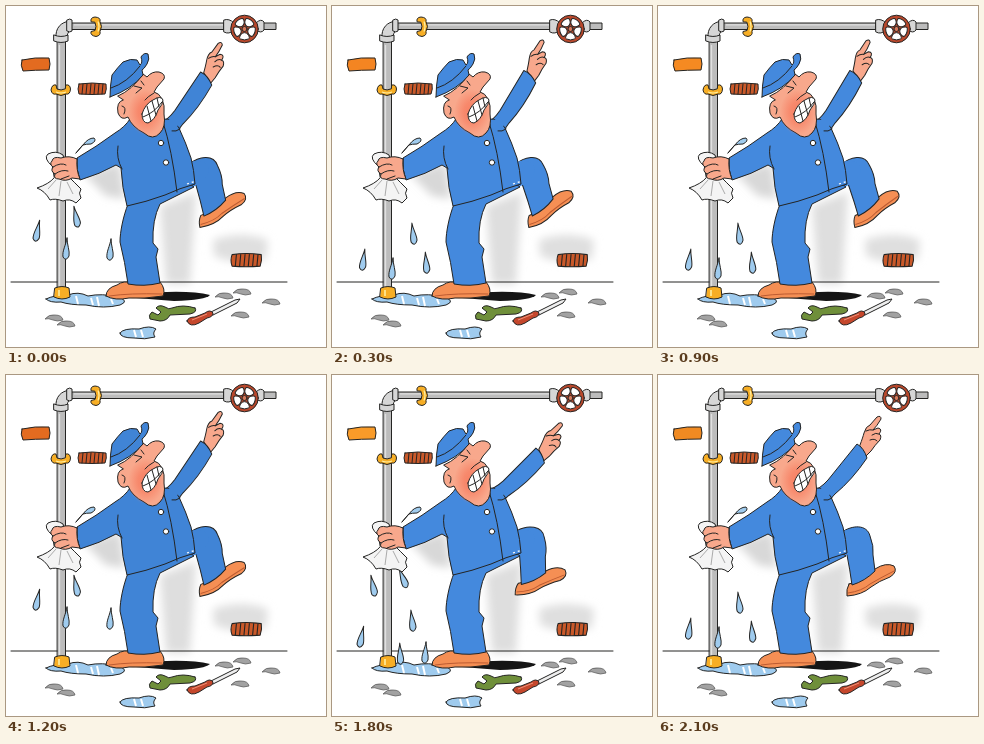
These frames come from a looping animation (320 by 341 pixels, 2.4 s). An HTML page:

```html
<!DOCTYPE html>
<html lang="en">
<head>
<meta charset="utf-8">
<title>Leaking pipe</title>
<style>
html, body { margin: 0; width: 100%; height: 100%; overflow: hidden; background: #fff; }
svg { display: block; width: 100vw; height: 100vh; }
.ink { stroke: #242423; stroke-width: 1; stroke-linejoin: round; stroke-linecap: round; }
.line { fill: none; }
.suit { fill: var(--suit); }
.skin { fill: #f8a88c; }
.shoe { fill: #f58f54; }
.steel { fill: #bcbcbc; }
.joint { fill: #d6d6d6; }
.brass { fill: #f7ae25; }
.brick { fill: #c9592a; }
.water { fill: #9fcbee; }
.stone { fill: #a2a2a2; stroke: #555; stroke-width: .7; }
</style>
</head>
<body>
<svg viewBox="0 0 320 341" preserveAspectRatio="none">
  <defs>
    <filter id="soft" x="-30%" y="-30%" width="160%" height="160%"><feGaussianBlur stdDeviation="4"/></filter>
    <radialGradient id="blush"><stop offset="0" stop-color="#f77f62"/><stop offset=".45" stop-color="#f77f62" stop-opacity=".75"/><stop offset="1" stop-color="#f77f62" stop-opacity="0"/></radialGradient>
    <g id="brickShape">
      <path class="ink brick" d="M1 1Q14-1 28 1Q29 6 27 11Q14 12 1 11Q-1 6 1 1Z"/>
      <path class="ink line" d="M5 1L4 11M9 1L8 11M13 1L12 11M17 1L16 11M21 1L20 11M25 1L24 11"/>
    </g>
    <g id="clamp">
      <path class="ink brass" d="M-5-5Q-6-9-1-9.5Q5-9 4-5Q7 0 4 5Q5 9 0 10Q-6 9-5 5L-1 4Q1 0-1-4Z"/>
      <path class="line" stroke="#fff2a8" stroke-width="1.2" d="M2-5Q4 0 2 5"/>
    </g>
    <path id="drop" class="ink water" d="M1-12C1-5 4 1 3 6Q0 12-3 7C-4 1 0-5 1-12Z"/>
    <path id="stone" class="stone" d="M-9 1Q-5-4 1-3Q8-3 9 2Q3 4-1 2Q-6 0-9 1Z"/>
  </defs>

  <!-- wall shadow and floor -->
  <g fill="#d8d8d8" filter="url(#soft)">
    <path d="M78 168L114 157L119 193L100 190Z"/>
    <path d="M154 200L190 186L184 278L160 278Z" fill="#dedede"/>
    <path d="M207 234Q235 224 262 234L260 253Q232 260 208 250Z" fill="#dfdfdf"/>
  </g>
  <path class="ink line" d="M5 276H281"/>
  <path d="M130 288Q180 283 204 289Q200 294 168 295L130 292Z" fill="#151515"/>

  <!-- bricks -->
  <path id="bareBrick" class="ink" d="M16 54Q29 51 43 52Q45 58 43 64Q29 64 17 65Q14 59 16 54Z"/>
  <use href="#brickShape" x="72" y="77"/>
  <use href="#brickShape" transform="translate(225 247.5) scale(1.08 1.15)"/>

  <!-- puddles and stones -->
  <path class="ink water" d="M40 293Q48 289 62 289Q72 285 82 290Q96 287 112 291Q124 295 114 299Q98 303 80 299Q64 299 55 296Q44 297 40 293Z"/>
  <path class="line" stroke="#fff" stroke-width="2" d="M70 290L72 298M85 292L87 299M91 291L93 300M105 293L107 298"/>
  <path class="ink water" d="M114 327Q117 322 133 323Q144 319 150 323Q146 327 149 331Q139 334 128 332Q114 332 114 327Z"/>
  <path class="line" stroke="#fff" stroke-width="2" d="M128 324L130 331M135 324L137 331"/>
  <use href="#stone" x="218" y="290"/>
  <use href="#stone" x="236" y="286"/>
  <use href="#stone" x="265" y="296"/>
  <use href="#stone" x="234" y="309"/>
  <use href="#stone" x="48" y="312"/>
  <use href="#stone" x="60" y="318"/>

  <!-- pipes -->
  <g class="ink steel">
    <path d="M66 17H218V23.5H66ZM256 17H270V23.5H256Z"/>
    <path d="M51.5 35H59.5V284H51.5Z"/>
  </g>
  <path stroke="#e0e0e0" stroke-width="1.3" d="M68 18.8H217M53.5 39V281"/>
  <g class="ink joint">
    <path d="M50 32C49 22 55 16 64 15V25Q61 26 61 33Z"/>
    <path d="M48 29Q55 32 62 29V35Q55 38 48 35Z"/>
    <path d="M61 14Q64 12 66 14V25Q64 27 61 25Z"/>
    <path d="M218 14Q223 12 228 17V24Q223 29 218 26Z"/>
    <path d="M250 17Q255 12 258 16V24Q255 28 250 24Z"/>
  </g>
  <use href="#clamp" x="90" y="20.5"/>
  <use href="#clamp" transform="translate(55 84) rotate(90)"/>
  <path class="ink brass" d="M49 282Q56 279 63 282L64 291Q56 295 48 291Z"/>
  <path stroke="#fff2a8" stroke-width="1.5" d="M53 284V290"/>
  <g transform="translate(238.5 23)">
    <circle class="ink" r="13.8" fill="#b9482c"/>
    <g id="holes"></g>
    <circle class="ink" r="2.5" fill="#d5795b"/>
  </g>

  <g id="drops"></g>
  <path class="ink water" d="M70 147L77 139Q82 132 88 132Q91 135 85 138Q80 138 77 139Z"/>

  <!-- tools -->
  <path class="ink" fill="#6f8f3a" d="M189 302Q192 306 184 308L164 309Q161 315 154 315L144 313Q142 309 146 306L152 309L155 306L150 302Q153 298 159 301Q163 304 166 302Q177 298 189 302Z"/>
  <path class="ink" fill="#eee" d="M205 306L229 294L234 293L231 297L207 309Z"/>
  <path class="ink" fill="#c5472c" d="M181 315Q182 311 189 311L199 307Q204 303 207 307Q207 311 201 312L193 317Q184 322 181 315Z"/>
  <path class="line" stroke="#f0937a" d="M186 314L201 308"/>

  <!-- raised leg -->
  <g id="shin">
    <path class="ink shoe" d="M191 209Q206 206 217 194Q228 187 236 191Q240 197 232 202Q221 206 213 212Q204 220 189 221Q188 214 191 209Z"/>
    <path class="line" stroke="#bd5b31" d="M190 218Q204 216 212 209Q224 202 236 196"/>
    <path class="ink suit" d="M184 157C194 150 209 149 212 161Q216 171 215 180L217 196Q207 206 194 210Q192 195 189 180Z"/>
  </g>
  <path class="suit" d="M145 172L188 155Q203 153 203 166Q198 176 187 181L154 198Z"/>

  <!-- standing leg -->
  <path class="ink shoe" d="M100 290Q100 282 111 279Q118 274 126 277L154 276Q160 283 157 290Q138 293 123 292Q109 295 100 290Z"/>
  <path class="line" stroke="#bd5b31" d="M103 290Q124 287 156 288"/>
  <path class="ink suit" d="M122 198C117 211 114 226 114 236Q119 256 122 278Q138 281 154 277L150 251L152 243L147 237Q146 214 154 198L188 181L174 171Z"/>

  <!-- pointing arm -->
  <g id="arm">
    <path class="ink skin" d="M202 70Q205 62 206 58Q208 51 212 50L219 42Q223 40 223 44Q219 51 215 55L220 53Q225 54 221 59Q224 60 222 65Q217 70 213 76L208 81Z"/>
    <path class="ink line" d="M208 56Q212 54 215 55M214 60Q218 57 221 59M212 65Q217 63 219 66"/>
    <path class="ink suit" d="M154 116Q162 114 170 105L199 69Q206 73 209 83Q194 105 177 119L167 130Z"/>
  </g>

  <!-- jacket -->
  <path class="ink suit" d="M124 113Q119 121 109 127Q90 141 71 152Q70 164 74 174Q94 168 110 159L115 162Q116 182 121 200Q140 196 159 189Q174 182 189 178Q188 164 185 152Q180 137 173 122Q167 112 157 113Z"/>
  <path class="suit" d="M156 117L168 111L172 119L166 130Z"/>
  <path class="ink line" d="M116 163Q110 152 112 140M157 116Q166 144 171 186M148 130Q155 128 158 119M166 125Q170 126 174 123"/>
  <path stroke="#fff" stroke-width="1.3" stroke-dasharray="2 3" d="M181 178L190 175"/>
  <circle class="ink" cx="155" cy="137" r="2.7" fill="#fff"/>
  <circle class="ink" cx="160" cy="156.5" r="2.7" fill="#fff"/>

  <!-- cloth and gripping hand -->
  <path class="ink" fill="#f4f4f4" d="M46 160Q37 152 42 148Q50 144 57 149L62 170Q69 177 75 183Q72 187 75 192L70 197Q64 192 57 195Q49 192 44 194Q39 185 31 182Q43 178 48 172Z"/>
  <path class="line" stroke="#aaa" d="M50 174L42 183M55 175L53 190M61 176L67 188"/>
  <path class="ink skin" d="M71 153Q63 149 55 152Q47 150 46 155Q43 158 47 161Q44 165 49 168Q47 173 53 173Q60 176 66 172L74 173Q70 164 71 153Z"/>
  <path class="ink line" d="M47 161Q55 156 60 159M49 168Q56 163 62 165M55 173L63 170"/>

  <!-- head -->
  <path class="ink skin" d="M112 90Q126 84 137 68L141 71Q146 65 153 66Q160 68 158 73L151 81L148 86Q153 87 156 93Q159 99 158 108Q160 121 154 127Q147 135 138 127Q126 121 122 111Q115 115 112 107Q110 96 117 94Z"/>
  <ellipse cx="140" cy="106" rx="18" ry="23" fill="url(#blush)"/>
  <path class="ink line" d="M116 100Q121 101 118 108M128 80L136 82L130 87M135 75L138 79M139 94Q141 91 148 87"/>
  <path class="ink" fill="#fff" d="M136 108Q139 98 147 94Q155 89 157 94Q157 98 152 104Q149 114 142 117Q136 117 136 108Z"/>
  <path class="ink line" d="M137 111Q148 107 156 96M141 100L145 115M146 95L150 109M151 92L153 101"/>
  <path class="ink suit" d="M104 91Q104 80 106 69Q112 61 117 56Q125 52 131 54L134 59Q137 57 135 51Q138 46 142 48Q144 53 141 58Q138 63 136 64L137 69Q126 83 104 91Z"/>
  <path class="ink line" d="M105 82Q121 77 134 60"/>
</svg>
<script>
const STEP = 300;
const poses = [-5, -8, -13, -8, -5, 0, 6, 0];
const drips = [0, 1, 2, 1];
const brickColors = ["#e36b20", "#f48522", "#f58420", "#f58a22", "#e36b20", "#f08a22", "#f99b29", "#f08a22"];
// Each drop: x, y, tilt
const showers = [
  [[31, 226, 8], [60, 244, 0], [70, 212, -15], [104, 245, 0]],
  [[31, 255, 4], [60, 264, 0], [81, 229, -10], [94, 258, -8]],
  [[41, 212, -15], [29, 263, 8], [80, 247, -10], [68, 280, -6], [93, 279, 0], [71, 204, -25]]
];
const find = id => document.getElementById(id);

find("holes").innerHTML = [0, 1, 2, 3, 4].map(i =>
  `<path class="ink" fill="#fff" d="M-3.4-5.2Q-6-9-4-10Q0-11.8 4-10Q6-9 3.4-5.2Q0-2-3.4-5.2Z" transform="rotate(${i * 72 + 36})"/>`).join("");
find("drops").innerHTML = showers.map(shower => "<g>" + shower.map(([x, y, tilt]) =>
  `<use href="#drop" transform="translate(${x} ${y}) rotate(${tilt})"/>`).join("") + "</g>").join("");
const showerGroups = [...find("drops").children];

function draw(time) {
  const step = Math.floor(time / STEP) % poses.length;
  const angle = poses[step];
  find("arm").setAttribute("transform", `rotate(${angle} 163 118)`);
  find("shin").setAttribute("transform", `rotate(${angle} 197 165)`);
  find("bareBrick").setAttribute("fill", brickColors[step]);
  document.documentElement.style.setProperty("--suit", step % 4 ? "#4489dd" : "#4084d6");
  showerGroups.forEach((group, i) =>
    group.setAttribute("visibility", i === drips[step % 4] ? "visible" : "hidden"));
}

const start = performance.now();
function tick() {
  draw(performance.now() - start);
  requestAnimationFrame(tick);
}
tick();
</script>
</body>
</html>
```
